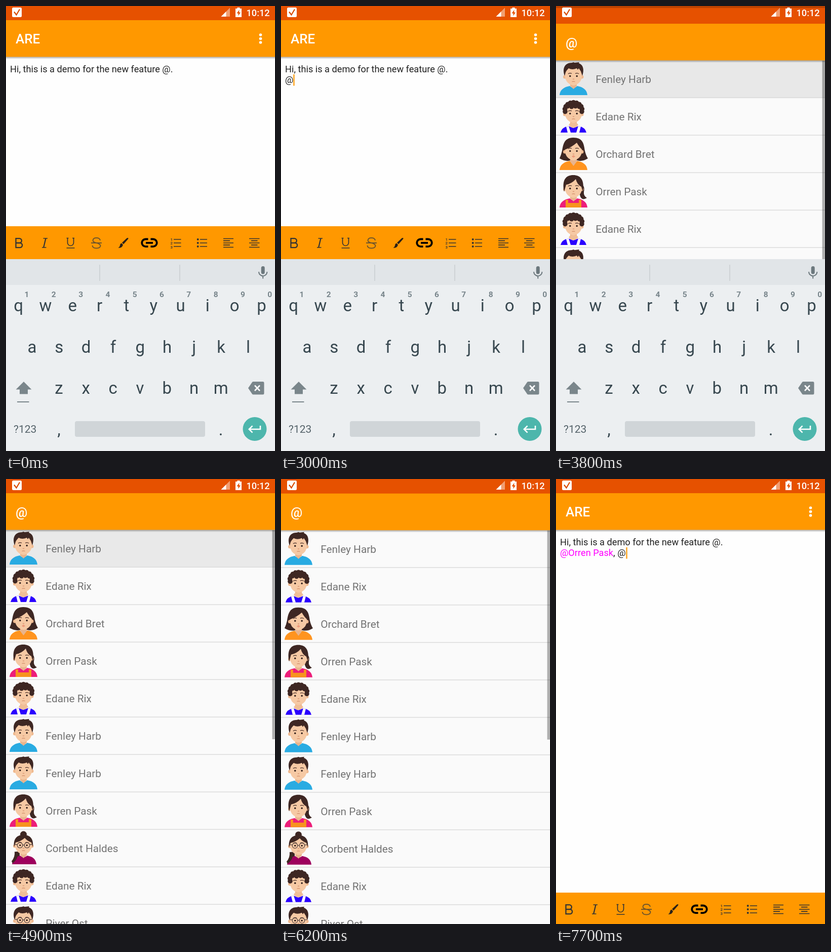
An HTML page for the animation above (8000 ms loop, 531x879 px).

```html
<!DOCTYPE html>
<html lang="en">
<head>
<meta charset="utf-8">
<title>Mention demo</title>
<style>
  html, body { margin: 0; width: 100%; height: 100%; overflow: hidden; background: #fff; }
  svg { display: block; width: 100vw; height: 100vh; }
  text { font-family: Roboto, "Noto Sans", sans-serif; white-space: pre; }
  .title { font-size: 26px; font-weight: 500; fill: #fff; }
  .body { font-size: 18.2px; fill: #212121; }
  .name { font-size: 20.8px; fill: #737373; }
  .key { font-size: 33px; fill: #37474f; text-anchor: middle; }
  .hint { font-size: 15.5px; font-weight: 700; fill: #78858b; text-anchor: middle; }
  .line { fill: none; stroke: #333; stroke-width: 1.7; }
</style>
</head>
<body>
<svg viewBox="0 0 531 879" preserveAspectRatio="none">
  <defs>
    <linearGradient id="shade" x2="0" y2="1">
      <stop offset="0" stop-color="#000" stop-opacity=".32"/>
      <stop offset="1" stop-color="#000" stop-opacity="0"/>
    </linearGradient>

    <g id="bar">
      <rect y="-3" width="531" height="32" fill="#e65100"/>
      <rect y="28" width="531" height="72.5" fill="#ff9800"/>
      <rect y="100.5" width="531" height="4.5" fill="url(#shade)"/>
    </g>

    <g id="face">
      <path d="M21 38h13v9l-6.5 6-6.500-6z" fill="#e9b48c"/>
      <circle cx="10.500" cy="29" r="3.500" fill="#efb98f"/>
      <circle cx="44" cy="29" r="3.500" fill="#efb98f"/>
      <path d="M11 20Q11 10 27.500 10T44 20V29Q43 39 34 44Q27.500 48 21 44Q12 39 11 29Z" fill="#f6c9a4"/>
      <path d="M17 23q4-2.500 7-.5M31 22.500q4-2 7 .5" fill="none" stroke="#4a302a" stroke-width="1.300"/>
      <circle cx="20.800" cy="27.500" r="1.700" fill="#2e1d1a"/>
      <circle cx="34.200" cy="27.500" r="1.700" fill="#2e1d1a"/>
      <path d="M26 33q1.500 1 3 0M24.500 38.500q3-1.200 6 0" fill="none" stroke="#d38d69" stroke-width="1.200"/>
    </g>
    <path id="torso" d="M0 65C1 54 9 49 20 47Q27.500 54 35 47C46 49 54 54 55 65Z"/>
    <path id="short" d="M10 27C5 12 10 1 25 1L27 0 30 1 39 0 38 2C47 5 49 15 45 27L42 18Q40 15 38 12L36 15 34 12Q25 16 18 12Q13 17 12 20Z" fill="#3e2723"/>
    <g id="specs" fill="none" stroke="#5d4a45" stroke-width="1.300">
      <circle cx="20.500" cy="27.500" r="5.200"/><circle cx="34.500" cy="27.500" r="5.200"/>
      <path d="M25.700 27h3.600M11 26h4M40 26h4"/>
    </g>

    <g id="boy">
      <use href="#torso" fill="#29abe2"/><use href="#face"/><use href="#short"/>
    </g>
    <g id="curly">
      <path d="M2 65Q4 55 17 52L27 56 38 52Q51 55 53 65Z" fill="#2a00ff"/>
      <path d="M13 53l5-1 4 13h-6zM42 53l-5-1-4 13h6z" fill="#fff"/>
      <use href="#face"/>
      <path d="M18 50Q27 61 37 50L34 46H21Z" fill="#f0be96"/>
      <g id="curls" fill="#3e2723"/>
    </g>
    <g id="bob">
      <path d="M27 1C8 1 7 17 5 27Q3 36 0 42Q12 49 21 46H35Q45 49 56 42Q52 36 50 27C48 13 46 1 27 1Z" fill="#3e2723"/>
      <use href="#torso" fill="#ff941f"/>
      <path d="M20 47L27.500 57 35 47Z" fill="#e9b48c"/>
      <use href="#face"/>
      <path d="M10 25C8 8 18 5 28 5S47 9 45 25Q39 20 34 11Q24 20 10 25Z" fill="#3e2723"/>
      <ellipse cx="27.500" cy="38" rx="2" ry="2.500" fill="#ef9a7c"/>
    </g>
    <g id="tail">
      <path d="M41 17Q51 22 48 34Q47 42 54 46Q43 53 40 40Z" fill="#3e2723"/>
      <use href="#torso" fill="#ed1e79"/>
      <path d="M12 50h5v6h21v-6h5v15H12z" fill="#f7931e"/>
      <use href="#face"/>
      <path d="M9 34C4 10 13 1 27 1S50 10 46 34L43 24Q35 20 32 9Q24 18 13 20Z" fill="#3e2723"/>
    </g>
    <g id="bun">
      <path d="M12 40Q16 50 5 63L20 62V40Z" fill="#3e2723"/>
      <path d="M5 65C7 54 13 50 21 48Q27.500 54 35 48C46 50 52 55 53 65Z" fill="#9e005d"/>
      <use href="#face"/>
      <path d="M14 41Q20 52 6 63L4 59Q11 51 10 40Z" fill="#3e2723"/>
      <circle cx="27.500" cy="6" r="6.500" fill="#3e2723"/>
      <path d="M9 31C7 14 15 7 27.500 7S48 14 46 31L43 22Q35 19 30 13Q22 20 12 22Z" fill="#3e2723"/>
      <use href="#specs"/>
    </g>
    <g id="nerd">
      <use href="#torso" fill="#f7931e"/><use href="#face"/><use href="#short"/><use href="#specs"/>
    </g>
  </defs>

  <!-- editor -->
  <rect width="531" height="879" fill="#fefefe"/>
  <use href="#bar"/>
  <text class="title" x="19" y="74">ARE</text>
  <g fill="#fff"><circle cx="502.500" cy="57" r="2.800"/><circle cx="502.500" cy="64.500" r="2.800"/><circle cx="502.500" cy="72" r="2.800"/></g>
  <text class="body" x="8" y="131">Hi, this is a demo for the new feature @.</text>
  <text class="body" x="8" y="152.300"><tspan id="mention" fill="#f0f"></tspan><tspan id="typed"></tspan></text>
  <rect id="caret" y="135" width="2.600" height="22.500" fill="#ffa726"/>

  <g id="tools">
    <rect y="435" width="531" height="66" fill="#ff9800"/>
    <path class="line" stroke-width="2.300" style="stroke-width:2.300" d="M19.500 459.200h7a4.400 4.400 0 0 1 0 8.800h-7zM19.500 468h8a4.600 4.600 0 0 1 0 9.200h-8z"/>
    <path class="line" d="M73.500 459h8.500M71 477h8.500"/>
    <path class="line" style="stroke-width:2.200" d="M78.500 459l-4.300 18"/>
    <path class="line" d="M119.500 458.500h4M131 458.500h4M121.500 458.500v9a6 6 0 0 0 12 0v-9M119.500 478h16"/>
    <path class="line" style="stroke:#70562b;stroke-width:2" d="M186 463Q185 458 178.500 458T171.500 463Q171.500 466.500 178.500 468T186.500 473.500Q186 478.500 178.500 478.500T170.500 473M168 468h21"/>
    <path d="M241.500 458.500Q240 457.500 238 459L229 467.500 232 470.500 240 461.500Q242 459.500 241.500 458.500ZM228 468.500Q225 469.500 225 473 224.500 476 221.500 477.500 229 479 231 471.500Z" fill="#2b2118"/>
    <path class="line" style="stroke:#000;stroke-width:3.800" d="M280.500 460.500h-5a7.300 7.300 0 0 0 0 14.600h5M285.500 460.500h5a7.300 7.300 0 0 1 0 14.600h-5M276 467.800h14"/>
    <path class="line" d="M331 461h14.500M331 468h14.500M331 475h14.500"/>
    <g font-size="8" font-weight="500" fill="#333"><text x="324.500" y="463.500">1</text><text x="324.500" y="471">2</text><text x="324.500" y="478.500">3</text></g>
    <path class="line" d="M383 461h14M383 468h14M383 475h14"/>
    <g fill="#333"><circle cx="378.700" cy="461" r="2"/><circle cx="378.700" cy="468" r="2"/><circle cx="378.700" cy="475" r="2"/></g>
    <path class="line" d="M429 459.500h20M429 463.700h13M429 468h20M429 472.200h13M429 476.500h20"/>
    <path class="line" d="M480 459.500h20.500M484 463.700h12.500M480 468h20.500M484 472.200h12.500M480 476.500h20.500"/>
  </g>

  <rect id="dim" width="531" height="879" opacity=".18"/>

  <!-- people list -->
  <g id="list">
    <rect y="100" width="531" height="790" fill="#fafafa"/>
    <rect id="focus" y="100" width="531" height="74" fill="#e8e8e8"/>
    <rect id="press" y="322" width="531" height="74" fill="#e8e8e8"/>
    <g id="rows"></g>
    <use href="#bar"/>
    <text class="title" x="19" y="74.500">@</text>
    <rect id="thumb" x="525.500" y="101" width="5.500" height="413" fill="#000" fill-opacity=".3"/>
  </g>

  <!-- keyboard -->
  <g id="board">
    <rect y="500" width="531" height="379" fill="#eceff1"/>
    <rect y="500" width="531" height="51" fill="#e1e5e8"/>
    <path d="M185 511v32M343 511v32" stroke="#c4cacd" stroke-width="1.300"/>
    <rect x="503.700" y="514" width="7" height="15.500" rx="3.500" fill="#6c787d"/>
    <path d="M499 525a8.200 8.200 0 0 0 16.400 0M507.200 533v5.500" fill="none" stroke="#6c787d" stroke-width="2"/>
    <g id="keys"></g>
    <path d="M35 742L50.500 757.500H43V766.500H27V757.500H19.500Z" fill="#7a868b"/>
    <path d="M22 782h23.500" stroke="#7a868b" stroke-width="2"/>
    <path d="M478 754.700L486 743Q486.700 742 488 742H507Q509.500 742 509.500 744.500V765Q509.500 767.500 507 767.500H488Q486.700 767.500 486 766.500Z" fill="#7a868b"/>
    <path d="M491 749.500l10 10.500M501 749.500l-10 10.500" stroke="#fff" stroke-width="2.600"/>
    <text x="15" y="843" font-size="21" fill="#546269">?123</text>
    <rect x="136" y="820" width="257" height="31" rx="4" fill="#d0d5d8"/>
    <circle cx="491" cy="835.500" r="23.500" fill="#4db6ac"/>
    <path d="M502 829v7h-22M486.500 829.300l-6.700 6.700 6.700 6.700" fill="none" stroke="#fff" stroke-width="2.600"/>
  </g>

  <!-- status icons -->
  <rect x="12" y="3" width="19" height="19" rx="2.500" fill="#fff"/>
  <path d="M16 11.500l4.500 6 6.500-11" fill="none" stroke="#d84a00" stroke-width="2.200"/>
  <path d="M424.500 21H442V3.500Z" fill="#fff" fill-opacity=".45"/>
  <path d="M424.500 21H434.500V11Z" fill="#fff"/>
  <path d="M456.500 3h5v2h3.500v17h-12V5h3.500z" fill="#fff"/>
  <path d="M460.500 7.500l-5 7h3v5l4.500-7h-3z" fill="#e65100"/>
  <text x="474.500" y="20" font-size="18.200" font-weight="500" fill="#fff">10:12</text>
</svg>

<script>
const $ = id => document.getElementById(id);
const LOOP = 8000, STEP = 100;

const people = {
  boy: 'Fenley Harb', curly: 'Edane Rix', bob: 'Orchard Bret',
  tail: 'Orren Pask', bun: 'Corbent Haldes', nerd: 'Piver Ost'
};
const order = 'boy curly bob tail curly boy boy tail bun curly nerd'.split(' ');

$('rows').innerHTML = order.map((who, i) => {
  const y = 100 + i * 74;
  return `<use href="#${who}" x="7" y="${y + 4}"/>
    <text class="name" x="78.300" y="${y + 45.300}">${people[who]}</text>
    <rect y="${y + 73.500}" width="531" height="1.300" fill="#d8d8d8"/>`;
}).join('');

// curls follow an arch over the forehead
let curls = '<path d="M10 22Q10 5 27.500 4T45 22Q42 14 36 13L27 15 19 13Q13 14 10 22Z"/>';
for (let i = 0; i <= 10; i++) {
  const a = Math.PI * (1.08 - i * 0.116);
  curls += `<circle cx="${27.5 + 17 * Math.cos(a)}" cy="${20 - 14.5 * Math.sin(a)}" r="4.800"/>`;
}
for (let i = 0; i < 4; i++) curls += `<circle cx="${16 + i * 7.700}" cy="${13 + i % 2}" r="4.500"/>`;
$('curls').innerHTML = curls;

const PITCH = 53.3;
const keyRow = (letters, x, y) => [...letters].map((c, i) =>
  `<text class="key" x="${x + i * PITCH}" y="${y}">${c}</text>`).join('');
const hints = [...'1234567890'].map((c, i) =>
  `<text class="hint" x="${41 + i * PITCH}" y="574.500">${c}</text>`).join('');
$('keys').innerHTML = hints + keyRow('qwertyuiop', 24.7, 603) + keyRow('asdfghjkl', 51.5, 684.5) +
  keyRow('zxcvbnm', 104.5, 766) + keyRow(',', 104.5, 847.5) + keyRow('.', 424, 847.5);

// each track: [start time, value] steps
const tracks = {
  caret: [[0, 0], [100, 1], [500, 0], [800, 1], [1200, 0], [1500, 1], [1900, 0], [2300, 1], [6700, 0], [7400, 1]],
  caretX: [[0, 8.3], [2500, 24.2], [6300, 114], [7400, 117.2], [7500, 121.7], [7600, 138.2]],
  typed: [[0, ''], [2500, '@'], [6300, ''], [7400, ','], [7500, ', '], [7600, ', @']],
  mention: [[0, ''], [6300, '@' + people.tail]],
  board: [[0, 1], [4000, 0]],
  dim: [[0, 0], [3700, .1], [3800, .18], [4000, 0]],
  fade: [[0, 0], [3700, .4], [3800, 1], [6300, .45], [6400, 0]],
  slide: [[0, 70], [3700, 59], [3800, 7], [3900, 1], [4000, 0], [6200, .7], [6300, 18]],
  focus: [[0, 1], [4900, .95], [5000, .45], [5100, 0]],
  press: [[0, 0], [5600, .35], [5700, .7], [5800, 1], [5900, .5], [6000, 0]],
  thumb: [[0, 1], [5300, .5], [5400, 0], [5600, 1]]
};

const at = (name, t) => {
  let value;
  for (const [start, v] of tracks[name]) if (start <= t) value = v;
  return value;
};
const alpha = (id, v) => $(id).setAttribute('opacity', v);

function draw(t) {
  $('mention').textContent = at('mention', t);
  $('typed').textContent = at('typed', t);
  $('caret').setAttribute('x', at('caretX', t));
  for (const id of ['caret', 'board', 'dim', 'focus', 'press', 'thumb']) alpha(id, at(id, t));
  alpha('list', at('fade', t));
  $('list').setAttribute('transform', `translate(0 ${at('slide', t)})`);
  $('tools').setAttribute('transform', `translate(0 ${at('board', t) ? 0 : 382})`);
}

const began = performance.now();
let shown = -1;
function tick() {
  const t = Math.floor((performance.now() - began) % LOOP / STEP) * STEP;
  if (t !== shown) draw(shown = t);
  requestAnimationFrame(tick);
}
tick();
</script>
</body>
</html>
```
